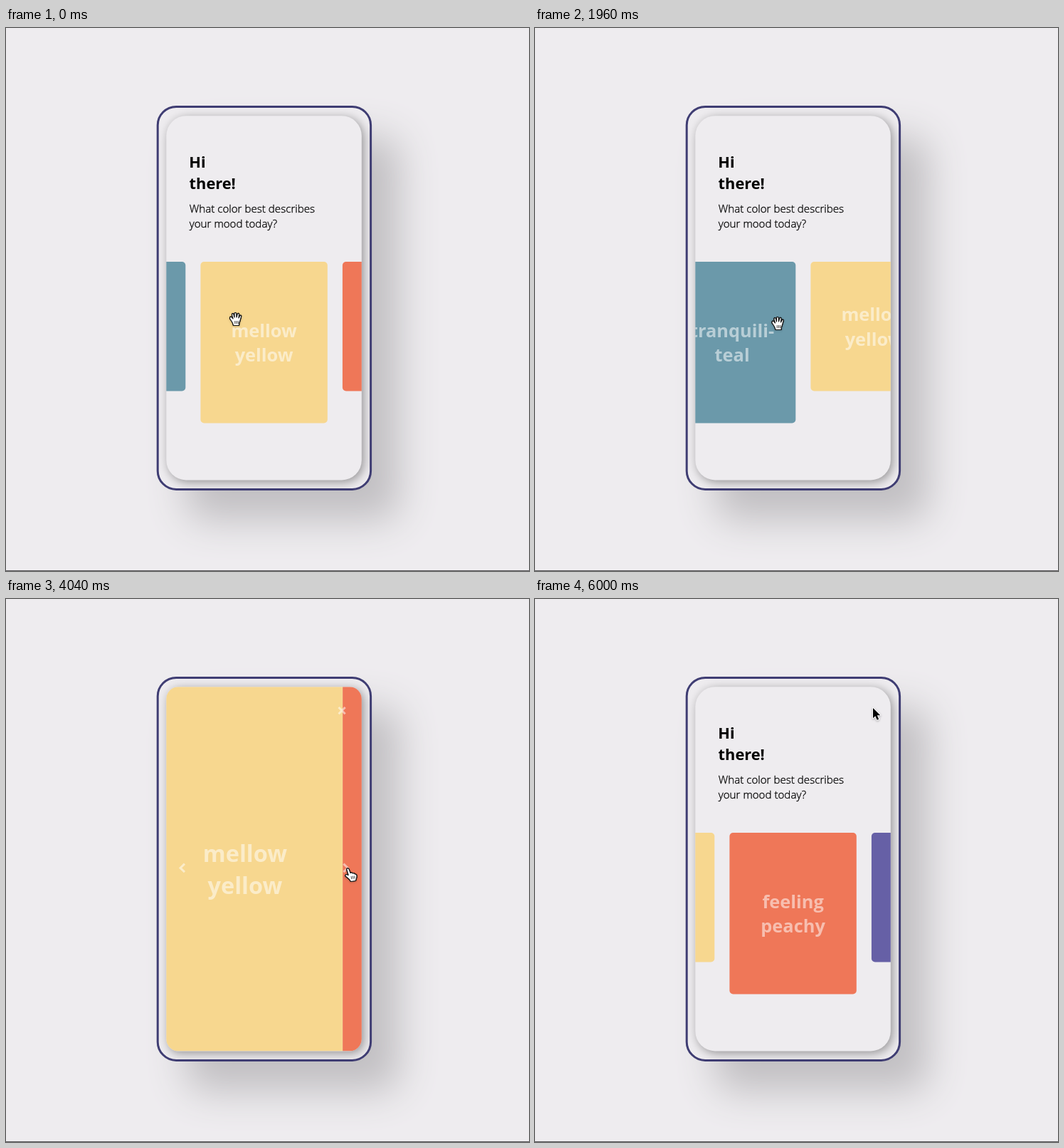
Write an HTML page with a canvas that moves like this. It is 735 px wide and 762 px high and loops after 6400 ms.

```html
<!DOCTYPE html>
<html lang="en">
<head>
<meta charset="utf-8">
<title>Mood picker</title>
<style>
  html, body { margin: 0; width: 100%; height: 100%; overflow: hidden; background: #eeecef; }
  canvas { display: block; }
</style>
</head>
<body>
<canvas id="stage" width="735" height="762"></canvas>
<script>
const ctx = document.getElementById('stage').getContext('2d');
const LOOP = 6400;
const BG = '#eeecef';
const FADED = 'rgba(255,255,255,.52)';
const FRAME = { x: 213.2, y: 110.4, w: 299.4, h: 537 };
const SCREEN = { x: 225.3, y: 123.2, w: 274.5, h: 511.3 };
const CARD = { x: 273.4, y: 328, w: 178.4, h: 226.4 };
const SIDE_HEIGHT = 181.4;
const PITCH = 199.5;
const YELLOW = 1, PEACH = 2;
const DRAG_RIGHT = { start: 370, release: 800, dx: 104 };
const DRAG_LEFT = { start: 1340, release: 1990, dx: 86 };
const MOODS = [
  { color: '#6b99aa', lines: ['tranquili-', 'teal'] },
  { color: '#f7d78f', lines: ['mellow', 'yellow'] },
  { color: '#ef7758', lines: ['feeling', 'peachy'] },
  { color: '#6660a6', lines: [] }
];

const clamp = v => Math.max(0, Math.min(1, v));
const mix = (a, b, k) => a + (b - a) * k;
const progress = (t, from, to) => clamp((t - from) / (to - from));
const easeInOut = k => k < .5 ? 2 * k * k : 1 - 2 * (1 - k) ** 2;
const smooth = k => k * k * (3 - 2 * k);
const tween = (t, from, to) => easeInOut(progress(t, from, to));

// Step response of an overdamped spring: stiffness 500, damping 50.
const spring = ms => 1 - 1.62 * Math.exp(-.0138 * ms) + .62 * Math.exp(-.0362 * ms);

// Softer, critically damped response for card heights.
const settle = ms => ms < 0 ? 0 : 1 - (1 + .0148 * ms) * Math.exp(-.0148 * ms);

// Cursor path: time, x, y
const PATH = [
  [0, 323, 409], [DRAG_RIGHT.start, 323, 409], [DRAG_RIGHT.release, 427, 415],
  [DRAG_LEFT.start, 427, 415], [DRAG_LEFT.release, 341, 415], [2300, 341, 415],
  [2640, 355, 416], [3080, 357.5, 417.5], [3400, 463, 382], [3640, 480.5, 378.5],
  [4560, 480.5, 378.5], [4880, 485, 140], [5200, 475, 153], [LOOP, 475, 153]
];

function cursorAt(t) {
  const i = Math.max(1, PATH.findIndex(p => p[0] > t));
  const [t0, x0, y0] = PATH[i - 1], [t1, x1, y1] = PATH[i];
  const k = smooth(progress(t, t0, t1));
  return { x: mix(x0, x1, k), y: mix(y0, y1, k) };
}

function cursorKind(t) {
  if (t < 2560) return 'grab';
  const pointing = (t >= 3400 && t < 4640) || (t >= 5120 && t < 5960);
  return pointing ? 'point' : 'arrow';
}

// Cards follow the hand, then spring on to the next page.
function swipe(t, { start, release, dx }) {
  if (t < release) return dx * smooth(progress(t, start, release));
  return mix(dx, PITCH, spring(t - release));
}

function carouselIndex(t) {
  const dragged = swipe(t, DRAG_RIGHT) - swipe(t, DRAG_LEFT);
  return YELLOW - dragged / PITCH + tween(t, 3900, 4540);
}

// How much each card is the selected one, 0 to 1.
function selection(t) {
  if (t > 3900) return [0, 0, 1, 0];
  const teal = settle(t - DRAG_RIGHT.release) - settle(t - DRAG_LEFT.release);
  return [teal, 1 - teal, 0, 0];
}

function roundRect({ x, y, w, h }, r) {
  ctx.beginPath();
  ctx.roundRect(x, y, w, h, r);
}

function fillRound(box, r, color) {
  ctx.fillStyle = color;
  roundRect(box, r);
  ctx.fill();
}

function castShadow(color, dx, dy, blur) {
  ctx.shadowColor = color;
  ctx.shadowOffsetX = dx;
  ctx.shadowOffsetY = dy;
  ctx.shadowBlur = blur;
}

function text(str, x, y, size, weight, color, align = 'left') {
  ctx.font = `${weight} ${size}px "Open Sans", sans-serif`;
  ctx.textAlign = align;
  ctx.fillStyle = color;
  ctx.fillText(str, x, y);
}

function label(lines, cx, cy, size) {
  lines.forEach((line, i) =>
    text(line, cx, cy + size * (i * 1.362 - .293), size, 700, FADED, 'center'));
}

function drawPhone(radius) {
  ctx.fillStyle = BG;
  ctx.fillRect(0, 0, 735, 762);
  ctx.save();
  castShadow('#c1bfc2', 40, 43, 54);
  fillRound(FRAME, 26, BG);
  ctx.restore();

  ctx.save();
  roundRect(FRAME, 26);
  ctx.clip();
  castShadow('rgba(0,0,0,.38)', 3, 3, 14);
  fillRound(SCREEN, radius, BG);
  ctx.restore();

  ctx.strokeStyle = '#3f3d73';
  ctx.lineWidth = 3;
  roundRect(FRAME, 26);
  ctx.stroke();

  ctx.fillStyle = '#59575a';
  ctx.fillRect(0, 761, 735, 1);
}

function drawGreeting() {
  text('Hi', 257.3, 196, 21.8, 700, '#000');
  text('there!', 257.6, 225.5, 21.8, 700, '#000');
  ctx.strokeStyle = '#000';
  ctx.lineWidth = .3;
  ['What color best describes', 'your mood today?'].forEach((line, i) => {
    const y = 259 + i * 20.5;
    text(line, 257.8, y, 15.15, 300, '#000');
    ctx.strokeText(line, 257.8, y);
  });
}

// The pages grow together until one fills the screen.
function drawCarousel(t, open) {
  const index = carouselIndex(t), selected = selection(t);
  const pitch = mix(PITCH, SCREEN.w, open);
  const size = mix(25.4, 32.5, open);
  MOODS.forEach(({ color, lines }, i) => {
    const offset = i - index;
    if (Math.abs(offset) > 1.7 || (open === 1 && Math.abs(offset) >= .999)) return;
    const box = {
      x: mix(CARD.x, SCREEN.x, open) + offset * pitch,
      y: mix(CARD.y, SCREEN.y, open),
      w: mix(CARD.w, SCREEN.w, open),
      h: mix(mix(SIDE_HEIGHT, CARD.h, selected[i]), SCREEN.h, open)
    };
    fillRound(box, 5 * (1 - open), color);
    label(lines, box.x + box.w / 2, box.y + box.h / 2, size);
  });
}

function drawIcons(alpha) {
  ctx.save();
  ctx.globalAlpha = alpha;
  ctx.strokeStyle = FADED;
  ctx.lineWidth = 3;
  ctx.stroke(new Path2D('M467.5 152 L476.7 161.2 M476.7 152 L467.5 161.2'));
  ctx.stroke(new Path2D('M251 371.6 L245 377.4 L251 383.2'));
  ctx.stroke(new Path2D('M474.4 371.6 L480.4 377.4 L474.4 383.2'));
  ctx.restore();
}

const CURSORS = {
  arrow: new Path2D('M0 0 V14.2 L3.3 11.3 L5.7 16.8 L8.2 15.7 L5.8 10.3 H10.3 Z'),
  grab: new Path2D('M-8.3 -3.2 C-7 -5 -5.3 -3 -4 -1 L-5.5 -6 C-6 -8.8 -3.5 -9 -3 -7 L-2 -3 L-2 -8' +
    'C-2 -10 .6 -10 .8 -8 L1 -3 L2.2 -7.5 C3 -9.3 5 -8.6 4.6 -7 L4 -2 L5.5 -5 C6.5 -6.5 8.2 -5.5 7.6 -4' +
    'C6.8 -1 5.8 3 4.8 5 L4.5 8.5 H-3.5 C-4 5 -6.5 1.5 -8.5 -1 Z'),
  point: new Path2D('M-1.8 1 C-2 -1 .8 -1.4 1.6 .6 L3.6 6 C5 5 6.3 5.5 6.8 6.6 C8.2 5.8 9.4 6.6 9.8 7.6' +
    'C11.4 7.2 12.4 8.4 12.5 10 C12.7 13 11.6 14 11 17 L4 18 C2 14 -1 12.5 -3.5 10.5' +
    'C-4.5 8.5 -2.5 7.5 .6 9 Z')
};
const CREASES = {
  grab: new Path2D('M-1.2 2 V6 M1 2 V6 M3.2 2 V6'),
  point: new Path2D('M4.6 10.5 L5.3 14.5 M6.9 10.2 L7.5 14.2 M9.2 10 L9.6 13.8')
};

function drawCursor(t) {
  const { x, y } = cursorAt(t), kind = cursorKind(t), arrow = kind === 'arrow';
  ctx.save();
  ctx.translate(x, y);
  ctx.lineJoin = 'round';
  ctx.lineWidth = arrow ? 2 : 1.2;
  ctx.strokeStyle = arrow ? '#fff' : '#111';
  ctx.fillStyle = arrow ? '#000' : '#fff';
  ctx.save();
  castShadow('rgba(0,0,0,.3)', 0, 1, 3);
  ctx.stroke(CURSORS[kind]);
  ctx.restore();
  ctx.fill(CURSORS[kind]);
  if (!arrow) {
    ctx.stroke(CURSORS[kind]);
    ctx.lineWidth = .8;
    ctx.stroke(CREASES[kind]);
  }
  ctx.restore();
}

function draw(t) {
  const open = tween(t, 2460, 3100) - tween(t, 5340, 5980);
  const radius = mix(28, 17, open);

  drawPhone(radius);
  ctx.save();
  roundRect(SCREEN, radius);
  ctx.clip();
  drawGreeting();
  drawCarousel(t, open);
  ctx.restore();
  drawIcons(open);
  drawCursor(t);
}

function tick() {
  draw(performance.now() % LOOP);
  requestAnimationFrame(tick);
}
tick();
</script>
</body>
</html>
```
